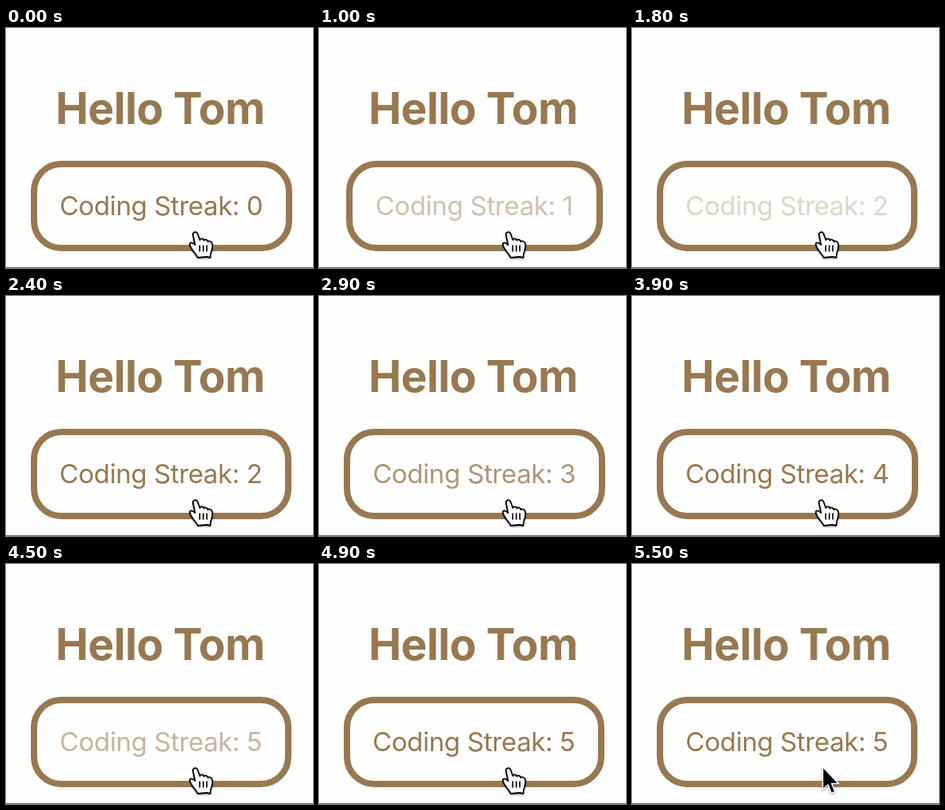
An HTML page that plays this animation: 384 by 300 pixels, repeating every 5.6 s.

```html
<!DOCTYPE html>
<html lang="en">
<head>
<meta charset="utf-8">
<title>Coding streak</title>
<style>
  html, body { margin: 0; width: 100%; height: 100%; overflow: hidden; background: #fefefe; }
  svg { display: block; width: 384px; height: 300px; }
  text { font-family: Inter, "Open Sans", sans-serif; fill: #977850; text-anchor: middle; }
  #title { font-size: 55px; font-weight: 700; letter-spacing: -.55px; }
  #label { font-size: 33px; letter-spacing: -.4px; }
  #frame { fill: none; stroke: #977850; stroke-width: 8; }
  .cursor { filter: drop-shadow(0 1.5px 1px rgba(0, 0, 0, .4)); stroke-linejoin: round; }
  #hand { fill: #fff; stroke: #000; stroke-width: 1.8; stroke-linecap: round; }
  #arrow { fill: #000; stroke: #fff; stroke-width: 1.6; }
</style>
</head>
<body>
<svg viewBox="0 0 384 300">
  <text id="title" x="192.8" y="119.8">Hello Tom</text>
  <rect id="frame" y="170" height="105" rx="34"/>
  <text id="label" y="233.6"></text>
  <rect y="299" width="384" height="1" fill="#666"/>
  <g id="hand" class="cursor" transform="translate(0 1)">
    <path d="M234 258C233 254 238 253 239.5 256L242.5 264C243 261.5 247 262 247.5 264.5C248.5 262.5 252 263.5 252.5 266C254 264.5 257.5 266 258 269C259 274 257 278 256 281L255.5 286L251 285L240 286C238 282 235 280 233 276C231 273 229.5 271 230 268.5C231 266.5 234 267.5 236.5 270Z"/>
    <path d="M242.3 271v7M246.8 271v7M251.2 271v7" stroke-width="1.6"/>
  </g>
  <path id="arrow" class="cursor" d="M238.5 253.5V282L245 276L249.3 286.5L254 284.5L249.8 274.5H258.5Z"/>
</svg>
<script>
  const LOOP = 5600, STEP = 100, PRESS = 100, FADE = 400, DIM = 0.2, CENTER = 194.5;
  const releases = [875, 1750, 2612, 3475, 4325];
  const widths = [327, 321, 326, 327, 327, 326];
  const byId = id => document.getElementById(id);
  const [frame, label, hand, arrow] = ["frame", "label", "hand", "arrow"].map(byId);

  function labelOpacity(t, count) {
    if (t >= releases[count] - PRESS) return DIM;
    if (!count) return 1;
    return Math.min(1, DIM + (1 - DIM) * (t - releases[count - 1]) / FADE);
  }

  function cursorAt(t) {
    if (t >= 3500 && t < 3700) return null;
    return t >= 5300 ? arrow : hand;
  }

  function draw(t) {
    const count = releases.filter(r => t >= r).length;
    const width = widths[count] - 8;
    const left = Math.floor(CENTER - width / 2);
    frame.setAttribute("x", left);
    frame.setAttribute("width", width);
    label.textContent = "Coding Streak: " + count;
    label.setAttribute("x", left + width / 2 - 0.4);
    label.setAttribute("opacity", labelOpacity(t, count));
    const cursor = cursorAt(t);
    for (const el of [hand, arrow]) el.style.display = el === cursor ? "" : "none";
  }

  const start = performance.now();
  function tick() {
    const t = (performance.now() - start) % LOOP;
    draw(Math.floor(t / STEP) * STEP);
    requestAnimationFrame(tick);
  }
  tick();
</script>
</body>
</html>
```
